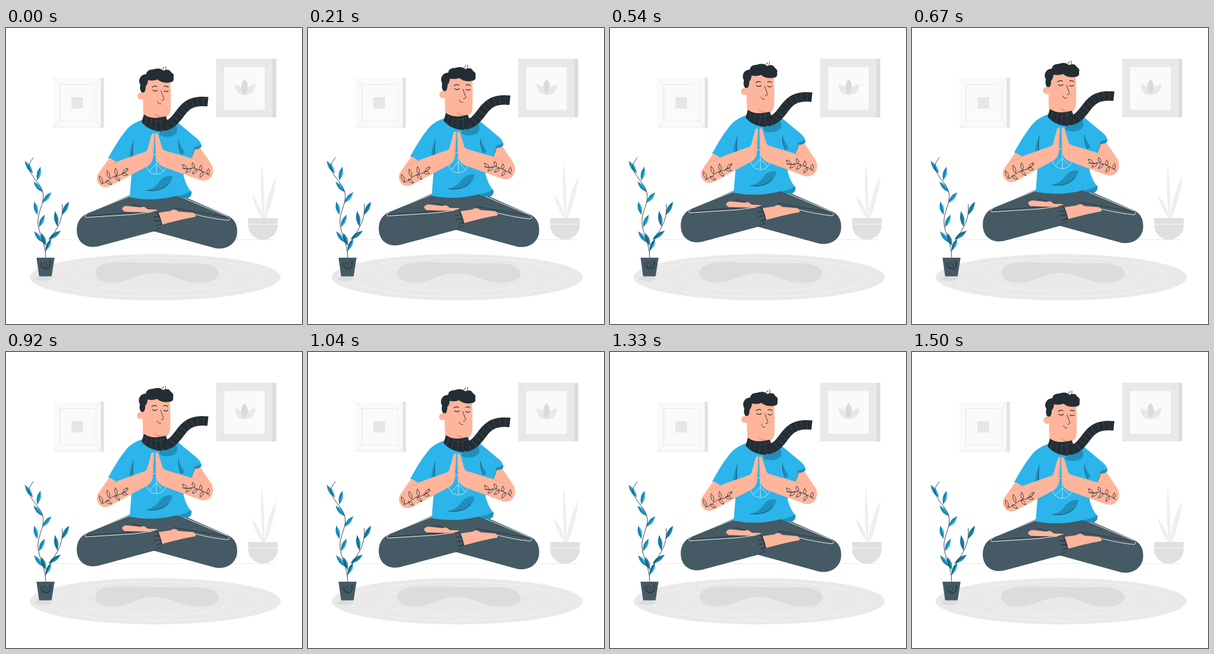
Write an HTML page that moves like this. It is 500 by 500 pixels and loops after 1.54 s.

```html
<!DOCTYPE html>
<html lang="en">
<head>
<meta charset="utf-8">
<title>Levitating meditation</title>
<style>
html, body { margin: 0; width: 100%; height: 100%; overflow: hidden; background: #fff; }
svg { display: block; width: 100vw; height: 100vh; }
.line { fill: none; stroke: #263238; stroke-width: .9; stroke-linecap: round; stroke-linejoin: round; }
.pale { fill: none; stroke: #e4e4e4; stroke-width: .8; }
.white { fill: none; stroke: #fff; stroke-width: .9; stroke-linecap: round; }
.skin { fill: #ffb59b; }
.shirt { fill: #2bb5ea; }
.shade { fill: #218fbc; }
.pants { fill: #455a64; }
.dark { fill: #232d33; }
</style>
</head>
<body>
<svg viewBox="0 0 500 500">
  <!-- wall pictures -->
  <path d="M80 84H161V168H80Z" fill="#fafafa"/>
  <path d="M160 84H165.500V168.500H160Z" fill="#e2e2e2"/>
  <path class="pale" d="M80 168H160M80 84L91 95.500M160 84L152 95.500M80 168L91 157M160 168L152 157"/>
  <path d="M91 95.500H152V157H91Z" fill="#fafafa" stroke="#ececec"/>
  <path class="pale" d="M91 157V95.500H139"/>
  <path d="M110.500 117H130V136H110.500Z" fill="#e6e6e6"/>
  <path d="M355 52H451V151H355Z" fill="#e9e9e9"/>
  <path d="M450 52H456.500V151H450Z" fill="#dcdcdc"/>
  <path class="pale" style="stroke:#dcdcdc" d="M355 52L369 66M450 52L437 66M355 151L369 138M450 151L437 138"/>
  <path d="M368.500 66H437V138H368.500Z" fill="#fafafa"/>
  <path d="M386 95Q401 97 403 113Q388 114 386 95ZM421.500 95Q405 97 403 113Q419 114 421.500 95Z" fill="#e8e8e8"/>
  <path d="M403 86Q392 99 403 113Q414 99 403 86Z" fill="#dadada"/>

  <!-- floor, rug and shadow -->
  <path d="M78 357.500H454" stroke="#e9e9e9"/>
  <ellipse cx="252" cy="421" rx="212" ry="39" fill="#e9e9e9"/>
  <g fill="none" stroke="#f4f4f4" stroke-width=".9">
    <ellipse cx="252" cy="421" rx="181" ry="33"/>
    <ellipse cx="252" cy="421" rx="130" ry="24"/>
  </g>
  <path d="M151 414C151 402 166 396 190 396C225 395 275 399 316 397C343 397 359 404 359 415C359 426 340 432 318 430C292 427 278 414 250 414C224 414 210 428 184 430C164 431 151 424 151 414Z" fill="#dcdcdc"/>

  <!-- white plant -->
  <path d="M434 321Q428 270 432 228Q438 275 436 321ZM436 321Q440 282 457 250Q453 288 439 321ZM433 321Q420 304 415 281Q429 296 435 321Z" fill="#efefef"/>
  <path d="M409 321H459V333A25 24.500 0 0 1 409 333Z" fill="#e0e0e0"/>
  <path d="M409 331.500H459" stroke="#f7f7f7"/>

  <!-- blue plant -->
  <ellipse cx="63" cy="423.500" rx="14" ry="4" fill="#dcdcdc"/>
  <g id="plant"></g>
  <path class="line" d="M46 219C42 226 36 230 40 241C46 255 61 265 63 282C64 298 53 312 54 329C55 348 67 362 67 388M67 377C72 355 88 341 93 322Q96 311 95 298"/>
  <path class="pants" d="M51.500 388H82L77 419.500H56Z"/>
  <path class="line" d="M60 396C55 404 66 409 69 401C70 394 61 394 62 402C64 410 77 408 74 399C71 390 79 391 74 402Q70 409 63 406"/>

  <g id="body">
    <!-- legs -->
    <path class="pants" d="M210 282L145 310Q119 318 119.500 342C120 362 135 373 155 369L250 343.500L350 371C371 377 390 365 390.500 345Q391 324 374 317L292 281Z"/>
    <path class="white" d="M209 284L139 312Q130 318 135 320L215 315L251 310M290 283L371 317Q381 322 376 325Q352 323 320 315"/>
    <path class="line" d="M136 318Q190 313 257 309M254 309Q235 303 213 298M284 304L376 320"/>
    <path class="skin" d="M196 305Q199 299 208 301L227 303Q234 300 239 306L255 307L257 310Q228 312 203 311Q197 309 196 305Z"/>
    <path class="skin" d="M258 312L278 309Q285 304 291 310L316 312Q322 315 320 319Q296 323 264 332Z"/>
    <path class="line" d="M254 309Q261 319 263 332M248 311L256 309M250 319L259 318M251 326L261 325M254 334L263 331" style="stroke-width:1.2"/>
    <path class="line" d="M203 311L228 312M250 343Q255 339 262 337"/>

    <!-- shirt -->
    <path class="skin" d="M314 203L326 199L348 232Q352 243 346 252L318 230Z"/>
    <path class="shirt" d="M233 154Q217 159 207 168C195 181 184 199 173 219Q181 226 190 229L214 220L209 286Q250 294 290 283Q301 289 308 287Q314 282 313 277Q304 266 300 250L302 221L313 222L319 202Q330 203 330 198Q328 191 323 187L288 158Z"/>
    <path class="shade" d="M288 284Q305 281 313 275Q315 284 308 287Q298 289 288 284ZM214 193Q207 211 209 222L215 219ZM291 191Q291 205 296 214L302 211ZM261 174L287 163Q292 173 287 179Q274 188 259 181ZM317 202Q325 198 330 197Q331 205 319 205Z"/>
    <path class="shade" d="M237 274Q252 271 260 258Q269 248 281 250Q280 263 265 272Q250 278 237 274Z"/>
    <path class="line" style="stroke-width:.6" d="M237 274.500Q262 277 274 263M215 191Q213 207 214 217M291.500 190Q291 205 297 214M319 203L313 222M173 219Q180 226 186 228"/>
    <g fill="none" stroke="#c4ecfb" stroke-width=".9">
      <circle cx="254" cy="230" r="17"/>
      <path d="M254 213V247M254 229L242 242M254 229L266 242"/>
    </g>

    <!-- arms -->
    <g id="armL">
      <path class="skin" d="M175 219L155 247Q151 258 158 265Q164 271 174 268L240 233Q248 228 249 215L251 179Q249 175 246 180L239 205Q238 209 232 210L186 226Z"/>
      <path class="line" style="stroke:#e8937a;stroke-width:.6" d="M169 234L190 226M250 180L248 216"/>
      <g id="vineL"></g>
    </g>
    <g id="armR">
      <path class="skin" d="M252 179Q254 175 257 180L264 203Q266 207 272 208L313 220L324 205L348 232Q352 244 346 252Q340 260 328 257L264 234Q254 229 253 217Z"/>
      <path class="line" style="stroke:#e8937a;stroke-width:.6" d="M313 220L334 229M251.500 180L253 216"/>
      <g id="vineR"></g>
    </g>

    <!-- head -->
    <g id="head">
      <circle class="skin" cx="228" cy="115" r="6"/>
      <path class="skin" d="M231 84H277Q279 105 278 138Q277 150 268 151V158H233Q231 135 231 84Z"/>
      <path d="M250 143Q257 149 268 149.500L267 153Q255 153 250 143Z" fill="#ef997f"/>
      <path class="dark" d="M229 109Q225 104 227 96C222 87 228 78 237 78Q238 70 248 70Q260 66 266 72Q276 68 279 75Q285 78 283 84Q285 91 276 92Q264 94 256 87Q249 90 240 88Q239 96 236 98Q236 106 233 109Z"/>
      <path class="line" d="M257 69Q266 75 268 72Q271 70 270 65M264 69Q267 69 267 66"/>
      <path class="line" style="stroke-width:1.200" d="M247 100Q251 97 255 99M267 99Q271 97 274 100M248 105Q252 108 256 105M267 106Q271 109 274 106"/>
      <path class="line" d="M262 106L267 120Q267 122 263 122M256 124Q257 129 262 128"/>
    </g>

    <!-- scarf -->
    <path id="tail" d="M341 124.500C318 122 306 128 295 143S278 164 266 166" fill="none" stroke="#232d33" stroke-width="16"/>
    <path d="M341 124.500C318 122 306 128 295 143S278 164 266 166" fill="none" stroke="#4a5a63" stroke-width="15" stroke-dasharray=".6 9" stroke-dashoffset="-7"/>
    <path class="dark" d="M233 146Q247 156 270 149L274 160Q270 172 262 175Q240 173 229 159Z"/>
    <path d="M238 151L235 164M246 153L243 169M254 154L252 172M262 153L262 174M251 158Q263 158 271 152" fill="none" stroke="#4a5a63" stroke-width=".6"/>
  </g>
</svg>
<script>
const NS = 'http://www.w3.org/2000/svg';
const $ = id => document.getElementById(id);

function path(parent, d, attrs) {
  const p = document.createElementNS(NS, 'path');
  p.setAttribute('d', d);
  for (const k in attrs) p.setAttribute(k, attrs[k]);
  parent.appendChild(p);
}

// Pointed leaf from tip (x, y) to base (u, v); side 0 = whole, 1 = one half.
function leaf(x, y, u, v, w, half) {
  const mx = (x + u) / 2, my = (y + v) / 2, len = Math.hypot(u - x, v - y);
  const nx = -(v - y) / len * w, ny = (u - x) / len * w;
  const back = half ? `L${x} ${y}` : `Q${mx - nx} ${my - ny} ${x} ${y}`;
  return `M${x} ${y}Q${mx + nx} ${my + ny} ${u} ${v}${back}Z`;
}

const leaves = [
  [32, 225, 45, 245], [58, 235, 53, 257], [47, 260, 62, 277], [76, 278, 62, 295],
  [48, 294, 53, 315], [65, 316, 56, 336], [48, 344, 62, 362], [76, 357, 67, 376],
  [60, 347, 67, 367, 1], [106, 294, 95, 315, 1], [83, 310, 87, 335, 1], [92, 343, 72, 357, 1]
];
for (const [x, y, u, v, deep] of leaves) {
  path($('plant'), leaf(x, y, u, v, 7), { fill: deep ? '#218fbc' : '#2bb5ea' });
  path($('plant'), leaf(x, y, u, v, 7, true), { fill: deep ? '#1c7ca4' : '#218fbc' });
  path($('plant'), `M${x} ${y}L${u} ${v}`, { class: 'line', style: 'stroke-width:.6' });
}

function vine(id, stem, list) {
  path($(id), stem, { class: 'line' });
  for (const l of list) path($(id), leaf(...l, 4.5), { class: 'line' });
}
vine('vineL', 'M161 263C172 262 177 250 189 249Q199 247 207 238', [
  [158, 250, 163, 262], [171, 241, 175, 254], [185, 237, 187, 249],
  [205, 237, 198, 245], [178, 264, 169, 258], [192, 258, 184, 250], [205, 248, 195, 246]
]);
vine('vineR', 'M298 237C309 241 314 233 324 239Q334 242 344 249', [
  [298, 231, 306, 238], [315, 228, 318, 236], [329, 232, 329, 241],
  [342, 238, 341, 247], [304, 244, 313, 237], [315, 246, 323, 239], [328, 252, 333, 243]
]);

const LOOP = 1540, FRAMES = 37, PEAK = 705, RISE = 9.6;

function draw(ms) {
  const step = LOOP / FRAMES;
  const t = Math.floor((ms % LOOP) / step) * step;
  const up = (1 + Math.cos((t - PEAK) / LOOP * 2 * Math.PI)) / 2;
  $('body').setAttribute('transform', `translate(0 ${(0.2 - RISE * up).toFixed(3)})`);
  $('head').setAttribute('transform', `translate(${(-0.9 * up).toFixed(3)} 0)`);
  $('armL').setAttribute('transform', `translate(0 ${0.7 * up}) rotate(${-0.7 * up} 165 255)`);
  $('armR').setAttribute('transform', `translate(0 ${0.7 * up}) rotate(${0.7 * up} 340 245)`);
}

const start = performance.now();
function tick() {
  draw(performance.now() - start);
  requestAnimationFrame(tick);
}
draw(0);
requestAnimationFrame(tick);
</script>
</body>
</html>
```
